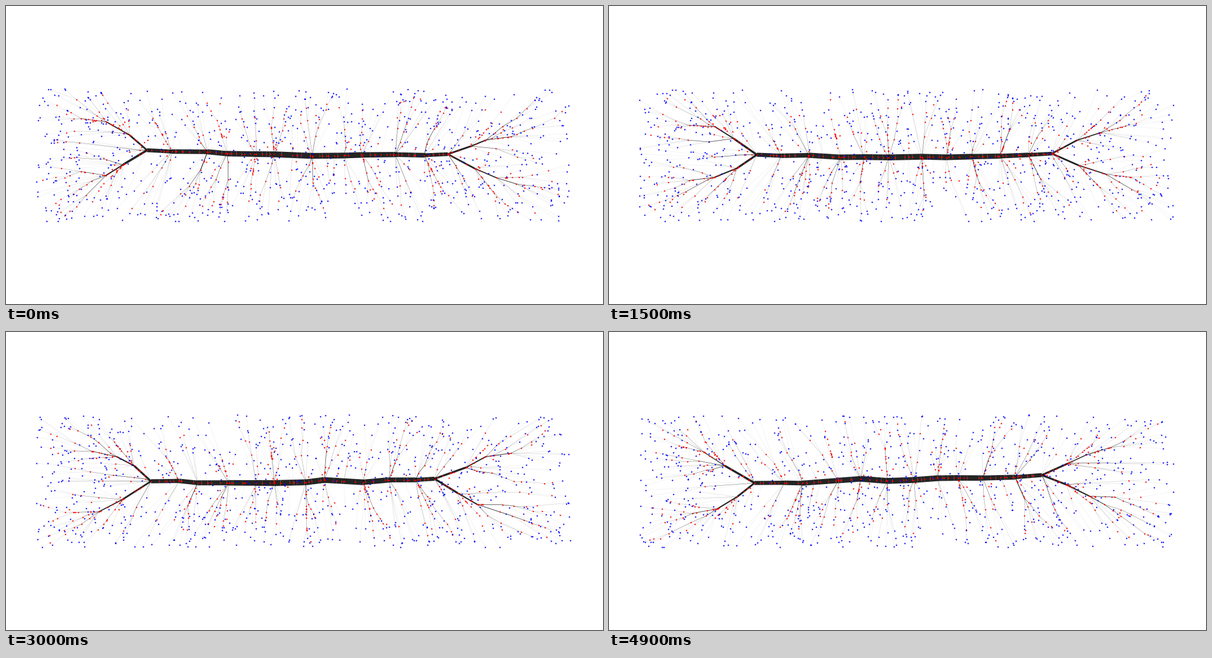
These frames come from a looping animation (1058 px wide and 529 px high, 5000 ms). A matplotlib script:

```python
import numpy as np
import matplotlib.pyplot as plt
from matplotlib.animation import FuncAnimation
from matplotlib.collections import LineCollection

W, H, DPI = 1058, 529, 100
PX = 72 / DPI
FRAMES, INTERVAL = 50, 100
LO, SIZE = np.array([53.5, 147.0]), np.array([947.0, 235.5])
MID_X = 527
N = 820
JOINTS = 12

# where the trunk forks on the left and right, and how high its middle sits
TIMES = [0, 6, 15, 24, 36, 42, 49]
LEFT_X = [250, 257, 262, 276, 238, 249, 258]
LEFT_Y = [256, 260, 264, 265, 265, 267, 268]
RIGHT_X = [783, 780, 785, 762, 757, 789, 767]
RIGHT_Y = [263, 261, 262, 259, 262, 258, 254]
MID_Y = [265, 266, 269, 267, 265, 261, 263]

rng = np.random.default_rng(12)


def drift(*shape, step=6):
    """Seeded noise that glides between random knots, one row per frame."""
    knots = rng.normal(0, 1, (FRAMES // step + 2, *shape))
    f = np.arange(FRAMES)
    u = (f % step / step).reshape(-1, *[1] * len(shape))
    return knots[f // step] * (1 - u) + knots[f // step + 1] * u


walk = rng.random((N, 2)) * SIZE + np.cumsum(rng.normal(0, 4, (FRAMES, N, 2)), axis=0)
points = LO + SIZE - np.abs(walk % (2 * SIZE) - SIZE)
fork_at = rng.uniform(0.25, 0.75, N)
forks = rng.random(N) < 0.38
sway = drift(JOINTS, 2) * (7, 1.6)
bough_len = 48 + 26 * drift(JOINTS)
arm_turn = 0.1 * drift(4, 4)
arm_len = 1 + 0.15 * drift(4, 2)


class Tree:
    """Nodes in order of growth, so a parent always precedes its children."""

    def __init__(self, root):
        self.xy = np.zeros((3000, 2))
        self.cost = np.full(3000, np.inf)
        self.parent = np.zeros(3000, int)
        self.blue = np.zeros(3000, bool)
        self.size = 0
        self.hubs = [self.add(root, 0, 0)]

    def add(self, xy, parent, cost, blue=False):
        i = self.size
        self.xy[i], self.parent[i], self.cost[i], self.blue[i] = xy, parent, cost, blue
        self.size += 1
        return i

    def grow(self, start, end, rate, gap, rnd):
        """Lay a limb with a few forks on it and return its end node."""
        a, base = self.xy[start].copy(), self.cost[start]
        d = np.hypot(*(end - a))
        last = start
        for t in np.append(np.sort(rnd.random(int(d / gap))), 1):
            last = self.add(a + (end - a) * t, last, base + rate * d * t)
        self.hubs.append(last)
        return last

    def sprout(self, start, angle, length, rate, gap, rnd):
        step = length * np.array([np.cos(angle), np.sin(angle)])
        return self.grow(start, self.xy[start] + step, rate, gap, rnd)

    def attach(self, i, p):
        n = self.size
        d = np.hypot(self.xy[:n, 0] - p[0], self.xy[:n, 1] - p[1])
        q = int(np.argmin(d + self.cost[:n]))
        if forks[i] and d[q] > 14:
            t = fork_at[i]
            q = self.add(self.xy[q] + (p - self.xy[q]) * t, q,
                         self.cost[q] + 0.965 * t * d[q])
        self.add(p, q, np.inf, True)

    def widths(self):
        load = self.blue[:self.size].astype(float)
        for i in range(self.size - 1, 0, -1):
            load[self.parent[i]] += load[i]
        m = load[1:] / N
        return 42 * m * (1 - m)


def trunk(frame):
    lx, ly, rx, ry, my = (np.interp(frame, TIMES, k)
                          for k in (LEFT_X, LEFT_Y, RIGHT_X, RIGHT_Y, MID_Y))
    u = np.linspace(0, 1, JOINTS)
    sag = my - (ly + ry) / 2
    line = np.column_stack([lx + (rx - lx) * u,
                            ly + (ry - ly) * u + 4 * sag * u * (1 - u)])
    line[1:-1] += sway[frame, 1:-1]
    return line


def pull(x):
    """Cost of running along the trunk: free in the middle, dear at the ends."""
    return 2 * abs(x - MID_X) / SIZE[0]


def build(frame):
    rnd = np.random.default_rng(5)
    line = trunk(frame)
    mid = JOINTS // 2
    tree = Tree(line[mid])
    node = {mid: 0}
    for a in [*range(mid, 0, -1), *range(mid, JOINTS - 1)]:
        b = a - 1 if a <= mid and a - 1 not in node else a + 1
        rate = pull((line[a, 0] + line[b, 0]) / 2)
        node[b] = tree.grow(node[a], line[b], rate, 7, rnd)

    # two arms at each fork, each ending in a pair of boughs
    for k in range(4):
        side, up = (-1 if k < 2 else 1), (-1 if k % 2 == 0 else 1)
        turn, size = arm_turn[frame, k], arm_len[frame, k]
        slope = 0.6 if side < 0 else 0.48

        def heading(angle):
            return np.arctan2(up * np.sin(angle), side * np.cos(angle))

        root = node[0 if side < 0 else JOINTS - 1]
        elbow = tree.sprout(root, heading(slope + turn[0]), 47 * size[0], 0.78, 10, rnd)
        hand = tree.sprout(elbow, heading(slope - 0.1 + turn[1]), 42 * size[1],
                           0.86, 10, rnd)
        tree.sprout(hand, heading(0.15 + turn[2]), 45, 0.93, 8, rnd)
        tree.sprout(elbow, heading(0.8 + turn[3]), 55, 0.93, 8, rnd)

    # trunk boughs lean outwards by the angle that the running cost allows
    for i, (x, _) in enumerate(line):
        if 0 < i < JOINTS - 1 and bough_len[frame, i] > 25:
            lean = np.arccos(pull(x))
            angle = lean if x > MID_X else np.pi - lean
            tree.sprout(node[i], angle if i % 2 == 0 else -angle,
                        bough_len[frame, i], 0.94, 8, rnd)

    # joints are favoured, which gathers the twigs into fans
    tree.cost[tree.hubs] -= 5

    pts = points[frame]
    gaps = np.hypot(*(pts[:, None] - tree.xy[None, :tree.size]).transpose(2, 0, 1))
    for i in np.argsort(gaps.min(axis=1)):
        tree.attach(i, pts[i])
    return tree


fig = plt.figure(figsize=(W / DPI, H / DPI), dpi=DPI, facecolor="white")
ax = fig.add_axes([0, 0, 1, 1])
ax.set_xlim(0, W)
ax.set_ylim(H, 0)
ax.axis("off")

edges = LineCollection([], colors=[(0, 0, 0, 0.86)], zorder=1)
ax.add_collection(edges)
dot = dict(ls="", marker="o", ms=2.4 * PX, mew=0)
reds, = ax.plot([], [], color="red", zorder=2, **dot)
blues, = ax.plot([], [], color="blue", zorder=3, **dot)


def draw(frame):
    tree = build(frame)
    n = tree.size
    xy, blue = tree.xy[:n], tree.blue[:n]
    edges.set_segments(np.stack([xy[tree.parent[1:n]], xy[1:]], axis=1))
    edges.set_linewidths(tree.widths() * PX)
    reds.set_data(xy[~blue].T)
    blues.set_data(xy[blue].T)
    return edges, reds, blues


anim = FuncAnimation(fig, draw, frames=FRAMES, interval=INTERVAL, repeat=True,
                     repeat_delay=0, blit=False)
plt.show()
```
